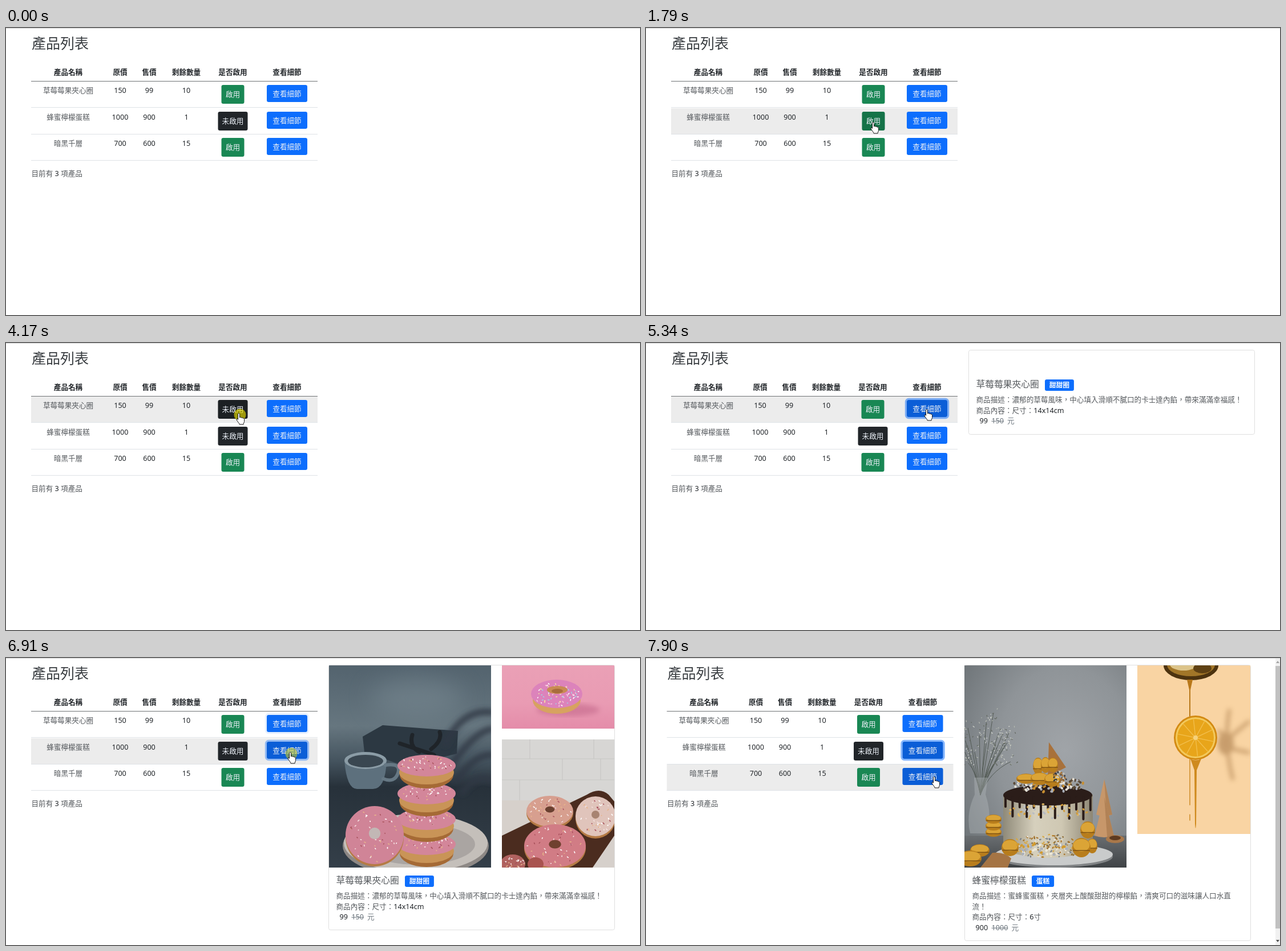
These frames come from a looping animation (1111x504 px, 8 s). An HTML page:

```html
<!DOCTYPE html>
<html lang="zh-Hant">
<head>
<meta charset="utf-8">
<title>產品列表</title>
<style>
html, body { margin: 0; width: 100%; height: 100%; overflow: hidden; background: #fff; }
svg { display: block; }
text { font-family: 'Noto Sans', 'Noto Sans CJK TC', 'Noto Sans CJK', sans-serif; white-space: pre; }
</style>
</head>
<body>
<svg id="stage" width="1111" height="504" viewBox="0 0 1111 504">
  <defs>
    <linearGradient id="slate" x2="0" y2="1"><stop stop-color="#53636e"/><stop offset=".3" stop-color="#66767f"/><stop offset=".47" stop-color="#45545f"/><stop offset=".6" stop-color="#27313a"/><stop offset="1" stop-color="#343f49"/></linearGradient>
    <linearGradient id="rose" x2="0" y2="1"><stop stop-color="#eaa0b6"/><stop offset=".6" stop-color="#e99bb3"/><stop offset="1" stop-color="#e48ca9"/></linearGradient>
    <radialGradient id="wall" cx=".62" cy=".42" r=".75"><stop stop-color="#a0a4a8"/><stop offset=".55" stop-color="#8f9498"/><stop offset="1" stop-color="#6f7579"/></radialGradient>
    <linearGradient id="cream"><stop stop-color="#8f8a79"/><stop offset=".35" stop-color="#d6d0bd"/><stop offset=".65" stop-color="#cfc8b3"/><stop offset="1" stop-color="#8d8674"/></linearGradient>
    <linearGradient id="table" x2="0" y2="1"><stop stop-color="#6a6e71"/><stop offset="1" stop-color="#3f4346"/></linearGradient>
    <filter id="soft"><feGaussianBlur stdDeviation="4"/></filter>
    <filter id="haze" x="-50%" y="-50%" width="200%" height="200%"><feGaussianBlur stdDeviation="20"/></filter>
  </defs>
  <g id="page"></g>
  <g id="donuts"></g>
  <g id="cake"></g>
  <g id="pointer"></g>
</svg>
<script>
const LOOP = 8000, SIZE = 12.6;
const layer = id => document.getElementById(id);

// ---------- drawing helpers ----------
const rect = (x, y, w, h, fill, more = '') =>
  `<rect x="${x}" y="${y}" width="${w}" height="${h}" fill="${fill}" ${more}/>`;
const oval = (x, y, rx, ry, fill, more = '') =>
  `<ellipse cx="${x}" cy="${y}" rx="${rx}" ry="${ry}" fill="${fill}" ${more}/>`;
const path = (d, fill, more = '') => `<path d="${d}" fill="${fill}" ${more}/>`;
const line = (d, color, width, more = '') =>
  path(d, 'none', `stroke="${color}" stroke-width="${width}" stroke-linecap="round" ${more}`);

// y is the middle of the glyphs; Latin runs are darker than the thin CJK
function text(x, y, s, { size = SIZE, anchor = 'start', weight = 300, fill = '#55595d', latin = '#212529' } = {}) {
  const runs = weight > 300 ? s : s.replace(/[!-~]+/g, `<tspan font-weight="400" fill="${latin}">$&</tspan>`);
  return `<text x="${x}" y="${y + size * .37}" font-size="${size}" text-anchor="${anchor}" font-weight="${weight}" fill="${fill}">${runs}</text>`;
}

let seed = 7;
const random = () => (seed = seed * 16807 % 2147483647) / 2147483647;

function specks(n, x, y, rx, ry, colors, width = 1.6) {
  let out = '';
  for (let i = 0; i < n; i++) {
    const a = random() * 6.28, r = Math.sqrt(random());
    const px = x + rx * r * Math.cos(a), py = y + ry * r * Math.sin(a);
    out += line(`M${px.toFixed(1)} ${py.toFixed(1)}l${(random() * 4 - 2).toFixed(1)} ${(random() * 4 - 2).toFixed(1)}`,
      colors[i % colors.length], width);
  }
  return out;
}

const photo = (x, y, w, h, art) =>
  `<svg x="${x}" y="${y}" width="${w}" height="${h}" viewBox="${x} ${y} ${w} ${h}">${art}</svg>`;

// ---------- pictures ----------
const candy = ['#f6e3e2', '#a8525c', '#fff', '#e8b58a'];

const stacked = y =>
  oval(737, y + 7, 47, 24, '#a56a35') + oval(737, y + 3, 48, 21, '#c99457') +
  oval(737, y - 9, 51, 19, '#d3869a') + specks(42, 737, y - 11, 46, 14, candy);

function ring(x, y, rx, ry, icing, hole) {
  return oval(x, y + 4, rx, ry, '#b57b45') + oval(x, y, rx, ry, icing) +
    specks(45, x, y, rx - 4, ry - 4, candy) + oval(x, y - 3, rx * .2, ry * .2, hole);
}

const donutStack = () => photo(566, 13, 284, 355,
  rect(566, 13, 284, 355, 'url(#slate)') +
  oval(720, 70, 80, 35, '#7c8c95', 'opacity=".5" filter="url(#haze)"') +
  path('M625 138L660 118 792 128 790 168 700 190 628 165z', '#2c3842') +
  line('M690 150q30 10 60 20M712 135q-6 20 12 30M745 160q20-15 15-30', '#1f2429', 7) +
  '<g filter="url(#soft)">' +
  line('M770 150Q800 90 850 95M775 195Q820 130 850 125M790 215Q820 170 850 170M800 235Q830 200 850 215', '#303a44', 12, 'opacity=".8"') + '</g>' +
  path('M593 180q4 50 22 50h28q22 0 24-50z', '#5d707d') +
  oval(630, 180, 37, 15, '#8b9ca6') + oval(630, 181, 31, 11, '#3a4751') +
  line('M665 188q28-4 22 14t-26 10', '#667884', 6) +
  oval(718, 330, 128, 54, '#8d8885') + oval(718, 325, 126, 51, '#c4bfba') + oval(722, 327, 100, 36, '#aaa5a2') +
  stacked(336) + stacked(292) + stacked(247) + stacked(198) +
  ring(646, 311, 51, 51, '#d08497', '#c2b7b5'));

const pinkDonut = () => photo(869, 13, 197, 111,
  rect(869, 13, 197, 111, 'url(#rose)') +
  oval(985, 91, 55, 11, '#c96f91', 'filter="url(#soft)" opacity=".7"') +
  oval(965, 74, 42, 24, '#d7a260') + oval(965, 63, 45, 25, '#dc83bb') +
  specks(70, 965, 64, 41, 21, ['#fff', '#9fd3e6', '#f7c4dc', '#f4e3a0']) +
  oval(966, 56, 18, 7, '#c98b54') + oval(966, 58, 10, 4, '#a86c3d'));

const tiles = line('M869 177H1066M869 214H1066M918 143V177M1030 143V177M975 177V214M1042 177V214M900 214V250', '#c2c1bf', 1.2, 'opacity=".7"');
const donutBoard = () => photo(869, 143, 197, 225,
  rect(869, 143, 197, 225, '#d7d6d4') + tiles +
  rect(869, 250, 197, 118, '#d6d0cb') +
  path('M869 312L1018 240Q1040 226 1056 240L1066 252V312L1028 368H869z', '#4b2c1f') +
  ring(953, 269, 41, 27, '#d79f8f', '#6a4030') + ring(1033, 278, 35, 35, '#e0c4bb', '#a88472') +
  ring(962, 330, 54, 38, '#d17c85', '#70402f') +
  oval(888, 362, 22, 17, '#b0625f') + oval(928, 362, 14, 12, '#a9534f') + specks(25, 890, 360, 20, 12, candy));

const macaron = (x, y, rx = 14, ry = 8) =>
  oval(x, y, rx, ry, '#b87d1c') + oval(x, y - ry * .25, rx * .9, ry * .65, '#dba436') +
  line(`M${x - rx * .9} ${y + ry * .3}H${x + rx * .9}`, '#7d5213', 1.5);
const cone = (x, y, w, h) =>
  path(`M${x} ${y}L${x + w} ${y + h}Q${x} ${y + h + 6} ${x - w} ${y + h}z`, '#c7976a') +
  path(`M${x} ${y}L${x + w} ${y + h}L${x + w * .3} ${y + h + 2}z`, '#a4764a', 'opacity=".6"');

function twigs() {
  let out = '';
  for (let i = 0; i < 18; i++) {
    const x = 558 + random() * 88, y = 95 + random() * 90;
    out += line(`M586 240Q${586 + (x - 586) * .3} 200 ${x.toFixed(1)} ${y.toFixed(1)}`, '#4f5650', .9) +
      specks(9, x, y, 13, 13, ['#b5b9b0', '#62685f', '#cfd2cb'], 1.3);
  }
  return out;
}

function drips() {
  let out = '';
  for (let i = 0; i < 13; i++) {
    const x = 630 + i * 12.4;
    out += line(`M${x} 245v${16 + (i * 17) % 33}`, '#2b1d19', 4);
  }
  return out;
}

const partyCake = () => photo(558, 13, 284, 355,
  rect(558, 13, 284, 355, 'url(#wall)') +
  rect(558, 312, 284, 56, 'url(#table)') + twigs() +
  path('M575 210h24l-4 30q12 35 3 68h-30q-8-35 8-68z', '#b9bfc3', 'opacity=".35"') +
  cone(803, 213, 14, 62) + cone(803, 244, 17, 68) +
  oval(715, 349, 103, 19, '#808385') + oval(715, 345, 103, 19, '#c9cbcb') +
  path('M626 240V338Q704 364 783 338V240z', 'url(#cream)') +
  oval(704, 241, 78, 18, '#2b1d19') + drips() +
  specks(45, 704, 270, 70, 14, ['#d09a3c', '#b9bcc2', '#e3ba62'], 3) +
  specks(150, 704, 330, 72, 20, ['#a8742c', '#78808c', '#d6a848', '#e8e2d6', '#8a6a34'], 2.2) +
  path('M706 148L736 192 704 208z', '#a8713b') +
  specks(110, 706, 222, 62, 13, ['#c98f30', '#a9adb6', '#e6e1d6', '#5a4a38'], 4) +
  macaron(687, 190, 9, 15) + macaron(700, 188, 8, 14) + macaron(713, 188, 9, 13) +
  macaron(666, 212, 17, 9) + macaron(690, 212, 16, 11) + macaron(712, 214, 14, 12) +
  specks(30, 726, 208, 13, 10, ['#383b40', '#cfc8b8', '#a8743a'], 2.5) +
  macaron(609, 306) + macaron(609, 295) + macaron(609, 283) +
  macaron(774, 302, 13, 15) + macaron(782, 330, 9, 13) + macaron(763, 333, 16, 17) + macaron(638, 333, 15, 15) +
  specks(34, 690, 335, 52, 12, ['#aab1bd', '#d29a2e', '#ece8da'], 4) +
  oval(822, 318, 16, 7, '#a9784a') + oval(822, 316, 10, 4, '#5d3a20') +
  macaron(585, 338, 17, 11) + macaron(568, 352, 20, 14) +
  path('M586 368L607 342Q628 340 640 352L634 368z', '#a57444'));

function lemon(x, y) {
  let out = oval(x, y, 38, 39, '#d38a12') + oval(x, y, 35, 36, '#f3c95c') + oval(x, y, 32, 33, '#e8a51a');
  for (let i = 0; i < 10; i++) {
    const a = i * Math.PI / 5 + .2;
    out += line(`M${x} ${y}L${x + 31 * Math.cos(a)} ${y + 32 * Math.sin(a)}`, '#f2be4c', 1.4);
  }
  return out + oval(x, y, 4, 4, '#f6d27c');
}

const honey = () => photo(861, 13, 198, 296,
  rect(861, 13, 198, 296, '#f9d4a3') +
  '<g filter="url(#soft)" opacity=".6">' +
  line('M1004 128L1026 146M1022 92Q1012 150 1028 212M1022 140L1056 112M1020 158L1056 166', '#a87a48', 6) +
  oval(1016, 150, 14, 20, '#a87a48') + '</g>' +
  oval(955, 13, 48, 26, '#4d330f') + oval(955, 12, 42, 20, '#a27628') + oval(942, 11, 24, 11, '#dcc48a') + oval(975, 18, 16, 9, '#5f4114') +
  path('M948 38h10l-4 18v48h-2V56z', '#b8781a') +
  line('M953 175V258M953 275V285', '#d0902f', 1.6) + lemon(963, 140) +
  path('M954 177q9 5 19 0l-8 20-1 94q-1 16-2 0l-1-94z', '#cf8a1e'));

// ---------- timeline ----------
// start, end, number of held positions, waypoints of the pointer tip
const moves = [
  [360, 1130, 12, [[611, 459], [466, 420], [430, 397], [403, 345], [388, 275], [396, 164]]],
  [1460, 1600, 2, [[396, 164], [398, 166]]],
  [3080, 3450, 6, [[398, 166], [408, 124]]],
  [4450, 4870, 7, [[408, 124], [492, 117]]],
  [6130, 6550, 7, [[492, 117], [498, 166]]],
  [6960, 7030, 2, [[498, 166], [499, 166]]],
  [7430, 7900, 7, [[499, 166], [505, 209]]]
];
const clicks = [[1460, 1600], [2600, 2740], [3560, 3700], [4170, 4240], [5200, 5340], [6820, 6960]];
const within = (t, a, b) => t >= a && t < b;

function tip(t) {
  const move = moves.filter(m => t >= m[0]).pop();
  if (!move) return null;
  const [start, end, steps, points] = move;
  const u = Math.min(1, Math.floor((t - start) / (end - start) * (steps - 1) + .001) / (steps - 1));
  const s = u * (points.length - 1), i = Math.min(Math.floor(s), points.length - 2), f = s - i;
  return [0, 1].map(k => points[i][k] + (points[i + 1][k] - points[i][k]) * f);
}

const buttonTop = row => Math.round(100 + 46.6 * row);

function hover(t) {
  const p = tip(t);
  if (!p || p[0] > 546 || p[1] < 94 || p[1] > 233) return { row: -1 };
  const row = Math.floor((p[1] - 93.5) / 46.6), dy = p[1] - buttonTop(row);
  const button = within(p[0], 371, 424) && within(dy, 0, 33) ? 'toggle'
    : within(p[0], 457, 528) && within(dy, 0, 30) ? 'detail' : '';
  return { row, button };
}
const focusRow = t => t < 5200 ? -1 : t < 6820 ? 0 : 1;

// Share of the last 150 ms for which a condition held
function eased(t, test) {
  let n = 0;
  for (let k = 0; k < 5; k++) n += test(t - k * 30) ? 1 : 0;
  return n / 5;
}

// ---------- page ----------
const products = [['草莓莓果夾心圈', 150, 99, 10], ['蜂蜜檸檬蛋糕', 1000, 900, 1], ['暗黑千層', 700, 600, 15]];
const heads = ['產品名稱', '原價', '售價', '剩餘數量', '是否啟用', '查看細節'];
const middles = [109, 200, 251, 316, 397.5, 492.5];

function button(x, y, w, h, label, color, dark, glow = 0) {
  const box = 'rx="3.2"';
  return (glow ? rect(x - 1.6, y - 1.6, w + 3.2, h + 3.2, 'none', `rx="4.8" stroke="#0d6efd" stroke-opacity="${glow / 2}" stroke-width="3.2"`) : '') +
    rect(x, y, w, h, color, box) + rect(x, y, w, h, '#000', `${box} opacity="${dark * .15}"`) +
    text(x + w / 2, y + h / 2, label, { anchor: 'middle', fill: '#e9eef5' });
}

function table(t) {
  const active = [!within(t, 3700, 4240), within(t, 1600, 2740), true];
  const nudge = active[1] ? 1 : 0, at = hover(t);
  const mid = i => middles[i] + (i && i < 5 ? nudge : 0);
  let out = text(45, 27, '產品列表', { size: 25, fill: '#3a3e42' });
  heads.forEach((s, i) => out += text(mid(i), 77, s, { anchor: 'middle', weight: 600, fill: '#212529' }));
  products.forEach((cells, r) => {
    const top = buttonTop(r), on = active[r];
    if (at.row === r) out += rect(44, top - 6, 502, 46, '#ececec');
    out += rect(44, top + 39, 502, 1, '#dee2e6');
    cells.forEach((s, i) => out += text(mid(i), top + 9, String(s), { anchor: 'middle' }));
    const over = name => eased(t, u => { const h = hover(u); return h.row === r && h.button === name; });
    const glow = eased(t, u => focusRow(u) === r), w = on ? 40 : 52;
    out += button(mid(4) - w / 2, top, w, 33, on ? '啟用' : '未啟用', on ? '#198754' : '#212529', over('toggle')) +
      button(457, top, 71, 30, '查看細節', '#0d6efd', Math.max(over('detail'), glow), glow);
  });
  return out + rect(44, 93, 502, 1, '#6f7275') + text(44.5, 255, '目前有 3 項產品');
}

function card(x, top, bottom, [name, price, sale], tag, badgeX, lines) {
  const left = x + 13.5, wide = tag.length * 11.8 + 15.5, gray = '#6c757d';
  let out = rect(x + .5, 12.5, 501, bottom - 12, '#fff', 'rx="3.2" stroke="#dfdfdf"') +
    text(left, top, name, { size: 15.75 }) +
    rect(badgeX, top - 8, wide, 20, '#0d6efd', 'rx="3.2"') +
    text(badgeX + wide / 2, top + 2, tag, { size: 11.8, anchor: 'middle', weight: 700, fill: '#fff' });
  lines.forEach((s, i) => out += text(left, top + 27 + i * 18.9, s));
  const y = top + 27 + lines.length * 18.9, saleX = left + 6, oldX = saleX + String(sale).length * 7.2 + 6.5;
  const end = oldX + String(price).length * 7.2;
  return out + text(saleX, y, String(sale)) + text(oldX, y, String(price), { latin: gray }) +
    rect(oldX, y, end - oldX, 1, gray) + text(end + 6, y, '元', { fill: gray });
}

const donutLines = ['商品描述：濃郁的草莓風味，中心填入滑順不膩口的卡士達內餡，帶來滿滿幸福感！', '商品內容：尺寸：14x14cm'];
const cakeLines = ['商品描述：蜜蜂蜜蛋糕，夾層夾上酸酸甜甜的檸檬餡，清爽可口的滋味讓人口水直', '流！', '商品內容：尺寸：6寸'];
const scrollbar = rect(1103, 1, 8, 503, '#f1f1f1') + rect(1103, 14, 8, 461, '#c1c1c1') +
  path('M1104 9l3-4 3 4z', '#a3a3a3') + path('M1104 495l3 4 3-4z', '#505050');

const PHOTOS = 5410, SECOND = 6960;

function page(t) {
  const second = t >= SECOND;
  let out = rect(0, 0, 1111, 1, '#d5d5d5') + `<g transform="translate(${second ? -7.5 : 0})">${table(t)}</g>`;
  if (second) out += card(558, 390, 496, products[1], '蛋糕', 676, cakeLines) + scrollbar;
  else if (t >= PHOTOS) out += card(565, 390, 477, products[0], '甜甜圈', 699, donutLines);
  else if (t >= 5340) out += card(565, 72, 160, products[0], '甜甜圈', 699, donutLines);
  return out;
}

const hand = 'M-1.5 1c0-2 3-2 3 0v6c1-1 3-1 3 .5c1-.8 2.8-.5 2.8.8c1-.5 2.3 0 2.3 1.2v4c0 2-1.5 3-1.5 5.5h-7c0-2-3.5-5-5-8c-.8-1.7 1-2.5 2-1.3l.4.6z';
const arrow = 'M0 0v16l4-4 3 6 2-1-3-6h5z';

function pointer(t) {
  const p = tip(t);
  if (!p) return '';
  const click = clicks.find(c => within(t, ...c));
  const mark = click ? oval(p[0] + 2, p[1] + 2, 10.5, 10.5, '#e6dc00', `opacity="${.65 - .25 * (t - click[0]) / (click[1] - click[0])}"`) : '';
  return mark + `<g transform="translate(${p})">` +
    path(hover(t).button ? hand : arrow, '#fff', 'stroke="#111" stroke-width="1" stroke-linejoin="round"') + '</g>';
}

layer('donuts').innerHTML = donutStack() + pinkDonut() + donutBoard();
layer('cake').innerHTML = partyCake() + honey();

const shown = {};
function put(id, markup) {
  if (shown[id] !== markup) layer(id).innerHTML = shown[id] = markup;
}
function draw() {
  const t = performance.now() % LOOP;
  put('page', page(t));
  put('pointer', pointer(t));
  layer('donuts').style.display = within(t, PHOTOS, SECOND) ? '' : 'none';
  layer('cake').style.display = t >= SECOND ? '' : 'none';
  requestAnimationFrame(draw);
}
draw();
</script>
</body>
</html>
```
